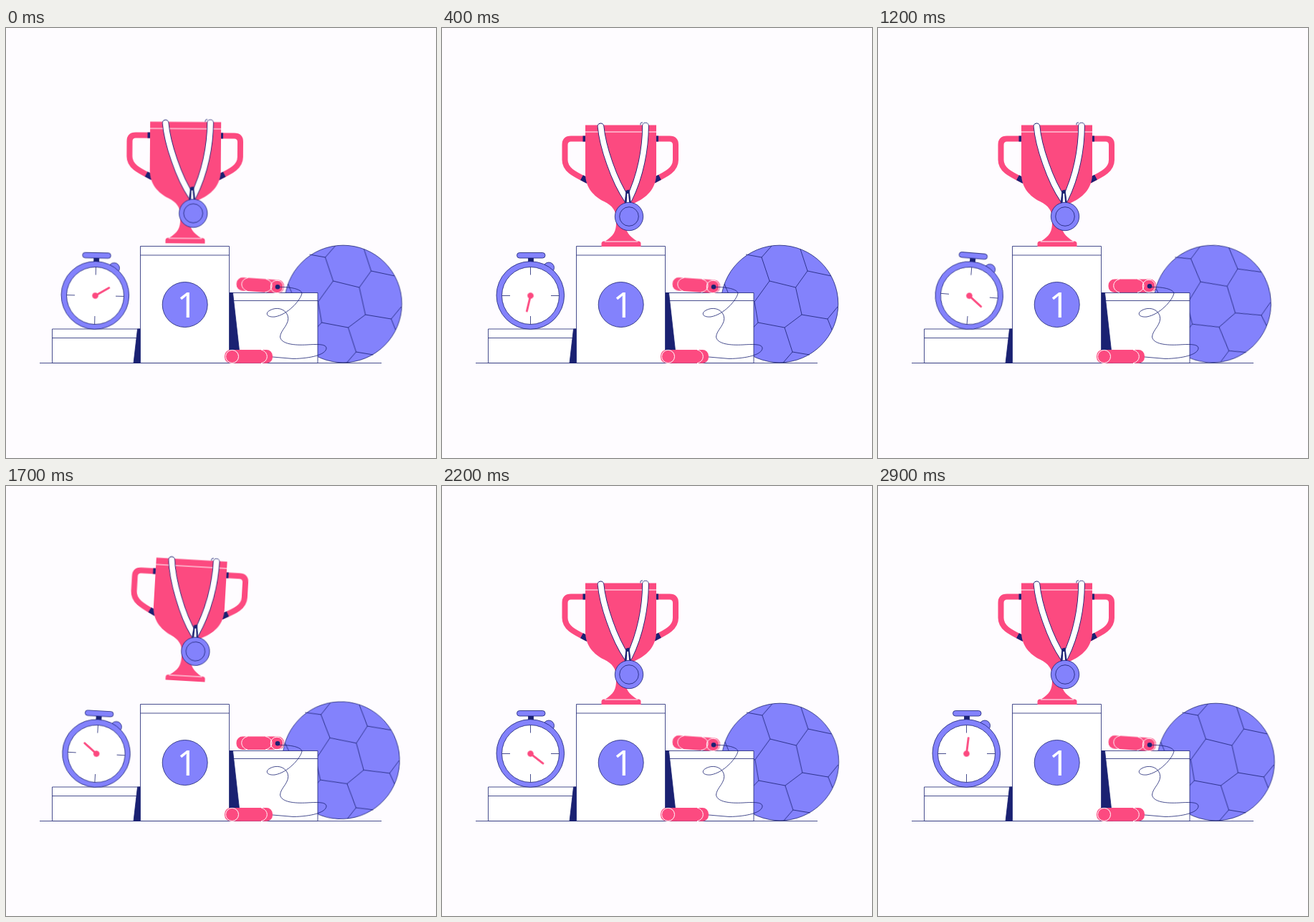
An HTML page without scripts that plays this animation: 600 px wide and 600 px high, repeating every 3000 ms.

```html
<!DOCTYPE html>
<html lang="en">
<head>
<meta charset="utf-8">
<title>Winner's podium</title>
<style>
  html, body { margin: 0; width: 100%; height: 100%; overflow: hidden; background: #fefcff; }
  svg { display: block; width: 100%; height: 100%; }
  .ink { stroke: #1a2172; stroke-width: .8; stroke-linejoin: round; }
  .navy { fill: #1a2172; }
  .violet { fill: #8382fc; }
  .pink { fill: #fc4a80; }
  .white { fill: #fff; }
  .line { fill: none; }
  .shine { fill: none; stroke: #fff; stroke-width: 1; }
  .grip { fill: none; stroke: #fc4a80; stroke-width: 8; }
  .joint { fill: none; stroke: #1a2172; stroke-width: 8; }
  .number { font: 49px "Noto Sans", sans-serif; fill: #fff; }

  /* The whole scene moves at ten poses a second. */
  .trophy, .medal, .watch, .hand, .ball, .handle { animation: 3s step-end infinite; }
  .trophy { animation-name: jump; transform-origin: 250px 305px; }
  .medal { animation-name: flop; transform-origin: 260px 263px; }
  .watch { animation-name: rock; transform-origin: 123.5px 420px; }
  .hand { animation-name: tick; transform-origin: 123.5px 373.5px; }
  .ball { animation-name: roll; transform-origin: 471px 385px; }
  .handle { animation-name: tip; transform-origin: 379px 360.5px; }

  @keyframes jump {
    0% { transform: translateY(-4.5px) rotate(.4deg); }
    3.33% { transform: translateY(-32px) rotate(3.2deg); }
    6.66% { transform: translateY(-39.5px) rotate(4deg); }
    10% { transform: translateY(-25.5px) rotate(2.6deg); }
    13.33% { transform: none; }
    16.66% { transform: translateY(-6px); }
    20% { transform: translateY(-4px); }
    23.33% { transform: none; }
    50% { transform: translateY(-22px) rotate(2.2deg); }
    53.33% { transform: translateY(-39px) rotate(4deg); }
    56.66% { transform: translateY(-33px) rotate(3.3deg); }
    60% { transform: translateY(-12.5px) rotate(1.3deg); }
    63.33% { transform: translateY(-4px); }
    66.66% { transform: translateY(-6px); }
    70%, 100% { transform: none; }
  }
  @keyframes flop {
    0% { transform: none; }
    3.33% { transform: translateX(1.5px); }
    13.33% { transform: none; }
    16.66% { transform: translate(-.5px, -1px) scaleY(.95); }
    20% { transform: translate(-1px, -2px) scaleY(.9); }
    23.33% { transform: none; }
    53.33% { transform: translateX(1px); }
    63.33% { transform: none; }
    66.66% { transform: translate(-1px, -2px) scaleY(.92); }
    70%, 100% { transform: none; }
  }
  @keyframes rock {
    0% { transform: rotate(1.3deg); animation-timing-function: steps(3); }
    10% { transform: rotate(0deg); }
    13.33% { transform: rotate(0deg); animation-timing-function: steps(2); }
    20% { transform: rotate(1deg); animation-timing-function: steps(3); }
    30% { transform: rotate(3.1deg); animation-timing-function: steps(3); }
    40% { transform: rotate(4.8deg); animation-timing-function: steps(2); }
    46.66% { transform: rotate(4.7deg); animation-timing-function: steps(4); }
    60% { transform: rotate(2.8deg); animation-timing-function: steps(4); }
    73.33%, 100% { transform: rotate(0deg); }
  }
  @keyframes tick {
    0% { transform: rotate(59deg); animation-timing-function: steps(3); }
    10% { transform: rotate(154deg); animation-timing-function: steps(3); }
    20% { transform: rotate(272deg); animation-timing-function: steps(8); }
    46.66% { transform: rotate(560deg); animation-timing-function: steps(4); }
    60% { transform: rotate(705deg); animation-timing-function: steps(4); }
    73.33% { transform: rotate(848deg); animation-timing-function: steps(7); }
    96.66%, 100% { transform: rotate(1087deg); }
  }
  @keyframes roll {
    0% { transform: translateX(-.5px); }
    10% { transform: none; }
    16.66% { transform: translate(-1.3px, -1.2px) rotate(-.8deg); }
    20% { transform: translate(-2.8px, -2.2px) rotate(-1.6deg); }
    23.33% { transform: translate(-3.6px, -1.8px) rotate(-2.8deg); }
    26.66% { transform: translate(-4.2px, -.6px) rotate(-3.6deg); }
    30% { transform: translateX(-4.5px) rotate(-4.4deg); }
    53.33% { transform: translate(-4.2px, -.8px) rotate(-3.6deg); }
    56.66% { transform: translate(-3.6px, -2.2px) rotate(-2.6deg); }
    60% { transform: translate(-2.6px, -3px) rotate(-1.4deg); }
    63.33% { transform: translate(-1px, -2.2px) rotate(-.6deg); }
    66.66% { transform: translate(.3px, -.8px); }
    70% { transform: translateX(.8px); }
    83.33%, 100% { transform: translateX(.4px); }
  }
  @keyframes tip {
    0% { transform: translateY(1px) rotate(4deg); }
    23.33% { transform: translateY(1px) rotate(4deg); animation-timing-function: steps(4); }
    36.66% { transform: none; }
    56.66% { transform: translateY(-1px); }
    60% { transform: translateY(-2.2px); }
    63.33% { transform: translateY(-1.6px) rotate(1deg); }
    66.66% { transform: rotate(2.4deg); }
    70%, 100% { transform: translateY(1px) rotate(4deg); }
  }
</style>
</head>
<body>
<svg viewBox="0 0 600 600">
  <defs>
    <g id="ribbon" fill="none" stroke-linecap="round">
      <path d="M284 136.500C284 168 277 207 261 239"/>
      <path d="M221.500 137.300C224 165 240 213 258 239"/>
    </g>
  </defs>

  <g class="ball ink">
    <circle class="violet" cx="471" cy="385" r="81.800"/>
    <path class="line" d="M457 353L493.500 362 502 400 478 418 441 411 436 382Z
      M457 353L446 320 460 304M446 320L424 316
      M493.500 362L510 339 500 308.500M510 339L543 346
      M502 400L538 406 552 389M538 406L544 421
      M478 418L489 452 476 467M489 452L513 456
      M441 411L419 434M436 382L402 376 394 357"/>
  </g>

  <g class="ink">
    <path class="line" d="M47 467.500H524"/>
    <path class="white" d="M64.500 420H188V467.500H64.500ZM64.500 432.500H184"/>
    <path class="navy" d="M183.500 420H188V467.500H178Z"/>
    <path class="white" d="M312 369.500H435V467.500H312ZM317 380.500H435"/>
    <path class="navy" d="M312 369.500H316.500L327.500 467.500H312Z"/>
    <path class="white" d="M187.500 304.500H311.500V467.500H187.500ZM187.500 317H311.500"/>
    <circle class="violet" cx="249.700" cy="386" r="31.500"/>
  </g>
  <text class="number" x="238.500" y="404">1</text>

  <g class="trophy">
    <path class="grip" d="M201 154.500H180Q171.500 154.500 171.500 163V184C171.500 198 185 204 203 213"/>
    <path class="grip" d="M298 154.500H317.500Q326 154.500 326 163V184C326 198 313 204 295 213"/>
    <path class="joint" d="M196.500 154.500H201M298 154.500H302M195 208.700L204 213.500M304 208.300L295 213"/>
    <path class="pink" d="M200 135.500H299V203C299 223 287 235 273 242C261 248 256 255 256 266V272C256 283 260 290 273 298H227C240 290 243 283 243 272V266C243 255 238 248 226 242C212 235 200 223 200 203Z"/>
    <path class="pink" d="M222.500 305V301Q222.500 297.500 226 297.500H274Q277.500 297.500 277.500 301V305Z"/>
    <path class="shine" d="M200 145H299M227 298H273"/>
    <path class="line ink" d="M280 132H278Q276.500 132.500 277 135.500"/>
    <use href="#ribbon" stroke="#1a2172" stroke-width="9.500"/>
    <use href="#ribbon" stroke="#fff" stroke-width="7.800"/>
    <g class="medal ink">
      <path class="navy" d="M257 227L261 226 263.500 245H255Z"/>
      <path class="white" stroke="none" d="M258.300 231H260L261.500 247H257.500Z"/>
      <circle class="violet" cx="261" cy="263" r="19.700"/>
      <circle class="line" cx="261" cy="263" r="13.300"/>
    </g>
  </g>

  <g class="watch ink">
    <circle class="violet" cx="149" cy="334.500" r="7.500"/>
    <rect class="navy" x="120.500" y="320" width="7" height="8"/>
    <rect class="violet" x="104.500" y="313.500" width="39.500" height="7.500" rx="3.700"/>
    <circle class="violet" cx="123.300" cy="373" r="47.300"/>
    <circle class="white" cx="123.500" cy="373.500" r="40"/>
    <path class="line" d="M123.500 333.500V344.500M123.500 402V413.500M83.500 373.500H95M152 373.500H163.500"/>
    <g class="hand" stroke="none">
      <circle class="pink" cx="123.500" cy="373.500" r="4.300"/>
      <path stroke="#fc4a80" stroke-width="2.800" stroke-linecap="round" d="M123.500 373.500V351.500"/>
    </g>
  </g>

  <g class="handle">
    <rect class="pink" x="321.500" y="350.500" width="66.500" height="18.500" rx="8.500"/>
    <path class="shine" d="M337 350.500C326 353 326 366 337 369M362 350.500C374 353 374 366 362 369"/>
    <circle class="shine" cx="378" cy="360" r="8.800"/>
    <circle class="navy" cx="379" cy="360.200" r="3.300"/>
  </g>
  <path class="ink line" d="M379 361.500C392 361 411 363 413 370C411 380 393 400 375 403C364 404 361 398 368 394C377 389 389 391 393 401C397 413 383 421 382.500 431C384 441 402 443 420 442C436 441 447 441 447 447C446 456 425 461 401 461.500L372 459"/>
  <rect class="pink" x="305" y="449" width="67" height="18.700" rx="8.500"/>
  <circle class="shine" cx="315.500" cy="458.400" r="9"/>
  <path class="shine" d="M356 449C367 452 367 465 356 467.700"/>
</svg>
</body>
</html>
```
